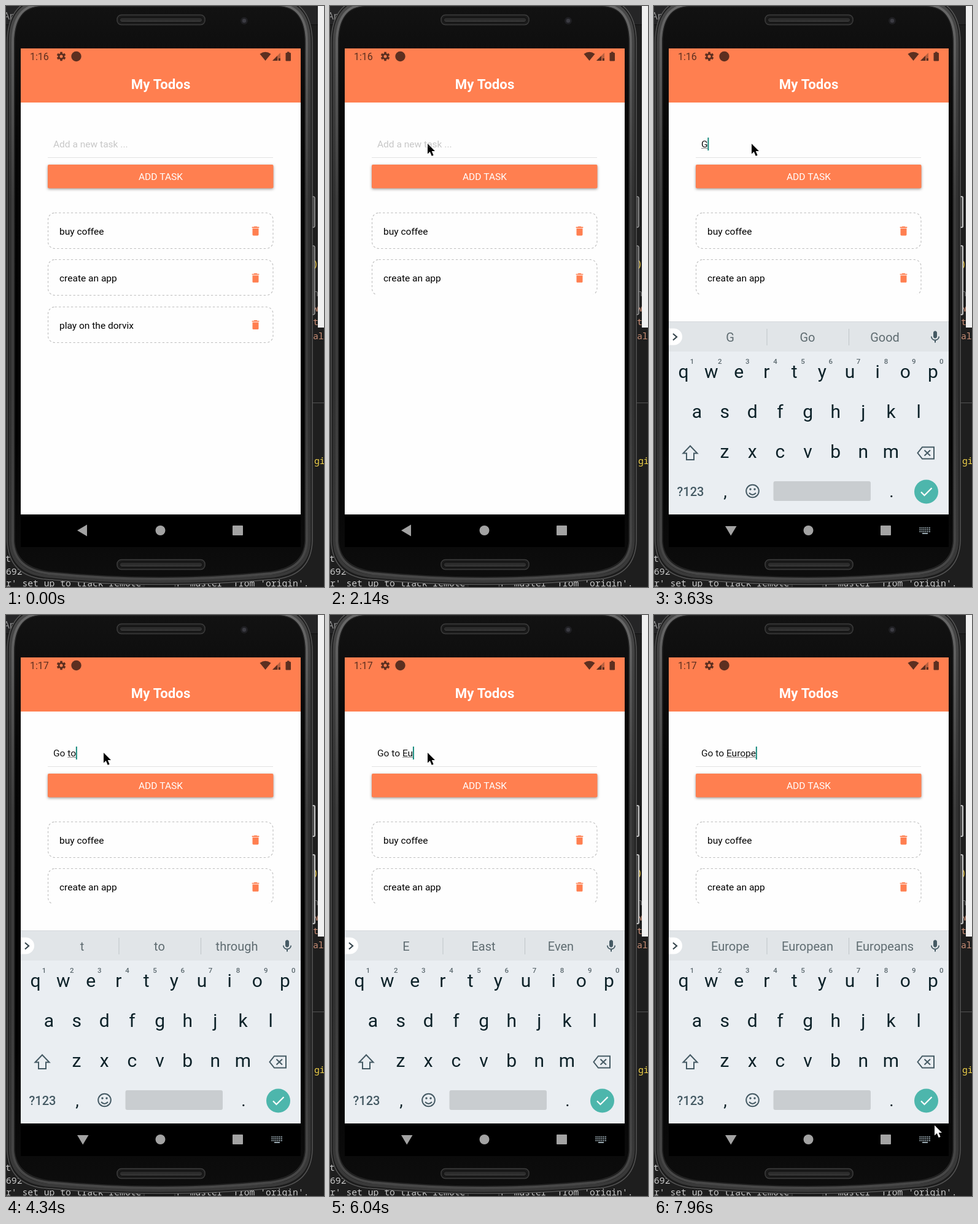
An HTML page with a canvas for the animation above (8000 ms loop, 518 px wide and 945 px high).

```html
<!DOCTYPE html>
<html lang="en">
<head>
<meta charset="utf-8">
<title>My Todos</title>
<style>
  html, body { margin: 0; width: 100%; height: 100%; overflow: hidden; background: #1e1e1e; }
  canvas { display: block; width: 518px; height: 945px; }
</style>
</head>
<body>
<canvas id="stage" width="518" height="945"></canvas>
<script>
const ctx = document.getElementById('stage').getContext('2d');
const LOOP = 8000;
const CORAL = '#ff7f50', TEAL = '#4db6ac', STATUS = '#5c2f20', SLATE = '#455a64', INK = '#0d2229';

// Each track is a list of [start time, value]; values hold until the next entry.
const typed = [
  [0, ''], [3480, 'G'], [3720, 'Go'], [4180, 'Go '], [4260, 'Go t'], [4340, 'Go to'],
  [4490, 'Go to '], [4950, 'Go to E'], [5180, 'Go to Er'], [5330, 'Go to Eru'],
  [5740, 'Go to Er'], [5880, 'Go to E'], [6040, 'Go to Eu'], [6110, 'Go to Eur'],
  [6500, 'Go to Euro'], [6650, 'Go to Europ'], [6730, 'Go to Europe']
];
const hints = [
  [0, ''], [3630, 'G|Go|Good'], [3800, 'Go|Good|Going'], [4340, 't|to|through'],
  [4410, 'to|too|took'], [4490, 'the|bed|home'], [4950, 'E|East|Even'], [5180, 'Er|Her|Were'],
  [5330, 'Eru|Brunch|Europe'], [5960, 'E|East|Even'], [6190, 'Eur|Euro|Europe'],
  [6650, 'Euro|#|Europe'], [6810, 'Europe|European|Europeans']
];
const caretOn = [
  [0, false], [1690, true], [2140, false], [2550, true], [3080, false],
  [3480, true], [7340, false], [7810, true]
];
const pointer = [
  [0, null], [80, [346, 737]], [150, [263, 395]], [380, [252, 338]], [460, [228, 230]],
  [540, [215, 172]], [770, [207, 176]], [850, [192, 186]], [920, [175, 199]],
  [1000, [161, 211]], [1080, [150, 218]], [1150, [142, 213]], [1230, [145, 204]],
  [1390, [133, 209]], [1460, [127, 214]], [1610, [146, 221]], [1690, [159, 224]],
  [7340, [250, 398]], [7420, [405, 692]], [7500, [508, 884]], [7650, [508, 886]],
  [7730, [497, 876]], [7810, [480, 856]], [7880, [466, 840]], [7960, [457, 830]]
];

function at(track, t) {
  let value = track[0][1];
  for (const [start, next] of track) if (t >= start) value = next;
  return value;
}

function text(str, x, y, size, color, align = 'left', weight = 400, family = 'Roboto, sans-serif') {
  ctx.font = `${weight} ${size}px ${family}`;
  ctx.textAlign = align;
  ctx.fillStyle = color;
  ctx.fillText(str, x, y);
}
const mono = (str, x, y, color) =>
  text(str, x, y, 14.7, color, 'left', 500, '"Noto Sans Mono", monospace');

function rect(x, y, w, h, color) {
  ctx.fillStyle = color;
  ctx.fillRect(x, y, w, h);
}

function round(x, y, w, h, r, fill, stroke) {
  ctx.beginPath();
  ctx.roundRect(x, y, w, h, r);
  if (fill) { ctx.fillStyle = fill; ctx.fill(); }
  if (stroke) { ctx.strokeStyle = stroke; ctx.stroke(); }
}

function circle(x, y, r, color) {
  ctx.beginPath();
  ctx.arc(x, y, r, 0, Math.PI * 2);
  ctx.fillStyle = color;
  ctx.fill();
}

function poly(points, color) {
  ctx.beginPath();
  points.forEach(([x, y]) => ctx.lineTo(x, y));
  ctx.closePath();
  ctx.fillStyle = color;
  ctx.fill();
}

function icon(d, x, y, scale, fill, stroke, width = 2) {
  const path = new Path2D(d);
  ctx.save();
  ctx.translate(x, y);
  ctx.scale(scale, scale);
  if (fill) { ctx.fillStyle = fill; ctx.fill(path); }
  if (stroke) { ctx.strokeStyle = stroke; ctx.lineWidth = width; ctx.stroke(path); }
  ctx.restore();
}

function gradient(x0, y0, x1, y1, ...colors) {
  const g = ctx.createLinearGradient(x0, y0, x1, y1);
  colors.forEach((c, i) => g.addColorStop(i / (colors.length - 1), c));
  return g;
}

function drawDesktop() {
  rect(0, 0, 518, 945, '#1e1e1e');
  rect(0, 0, 518, 30, '#252526');
  rect(0, 30, 518, 1, '#111');
  text('App', -4, 22, 15.5, '#969696', 'left', 400, '"Open Sans", sans-serif');
  mono(')', 500, 424, '#f2cc3c');
  mono('n', 500, 472, '#777');
  mono('w', 500, 497, '#ce9178');
  mono('t', 500, 519, '#ce9178');
  mono('al', 500, 542, '#ce9178');
  rect(498, 645, 20, 1, '#555');
  mono('gi', 502, 745, '#f5d54a');
  mono('t', -1, 904, '#ccc');
  mono('692', 0, 925, '#ccc');
  mono("r' set up to track remote branch 'master' from 'origin'.", 0, 944, '#ccc');
  rect(508, 0, 10, 523, '#f0f0f0');
}

function body(inset) {
  const l = 2 + inset, r = 499 - inset, top = inset - 11;
  ctx.beginPath();
  ctx.moveTo(l, 60);
  ctx.bezierCurveTo(l, 20, 18 + inset, top, 58, top);
  ctx.lineTo(443, top);
  ctx.bezierCurveTo(483 - inset, top, r, 20, r, 60);
  ctx.lineTo(r, 870);
  ctx.quadraticCurveTo(r - 2, 925 - inset, 441 - inset, 932 - inset);
  ctx.quadraticCurveTo(250, 950 - inset, 60 + inset, 932 - inset);
  ctx.quadraticCurveTo(l + 2, 925 - inset, l, 870);
  ctx.closePath();
}

function rim(inset, width, color) {
  body(inset);
  ctx.lineWidth = width;
  ctx.strokeStyle = color;
  ctx.stroke();
}

function speaker(y) {
  ctx.lineWidth = 1.5;
  round(181, y, 143, 16, 7, '#1b1b1b', '#3c3c3c');
  ctx.lineWidth = 1;
  round(185, y + 4, 135, 8, 4, gradient(0, y + 4, 0, y + 12, '#242424', '#383838'), '#0c0c0c');
}

function drawPhone() {
  for (const [y, h] of [[310, 50], [390, 112]]) round(496, y, 7, h, 2, '#4a4a4a', '#c4c4c4');
  round(225, 936, 50, 14, 5, '#151515', '#333');
  body(0);
  ctx.fillStyle = '#1c1c1c';
  ctx.fill();
  rim(0, 1.5, '#555');
  rim(5, 5, gradient(0, 0, 0, 945, '#484848', '#303030', '#303030', '#3a3a3a'));
  rim(9, 4, gradient(0, 0, 0, 945, '#686868', '#3c3c3c', '#3c3c3c', '#484848'));
  body(12);
  ctx.fillStyle = gradient(0, 0, 0, 945, '#121212', '#050505', '#020202', '#020202', '#0e0e0e');
  ctx.fill();
  rim(12, 1.2, '#262626');
  speaker(14.5);
  speaker(900.5);
  circle(388, 24, 6, '#1f1f22');
  circle(388, 24, 3.2, '#3b3b42');
  rect(24, 69, 456, 811, '#000');
}

function drawStatus(t) {
  text(t < 4180 ? '1:16' : '1:17', 39, 88, 16, STATUS);
  ctx.save();
  ctx.translate(90, 82);
  for (let i = 0; i < 6; i++) {
    rect(-1.8, -7.3, 3.6, 4, STATUS);
    ctx.rotate(Math.PI / 3);
  }
  ctx.beginPath();
  ctx.arc(0, 0, 3.9, 0, Math.PI * 2);
  ctx.lineWidth = 2.8;
  ctx.strokeStyle = STATUS;
  ctx.stroke();
  ctx.restore();
  circle(114.5, 82, 8.2, STATUS);
  ctx.beginPath();
  ctx.moveTo(422.5, 89);
  ctx.lineTo(413.5, 78);
  ctx.quadraticCurveTo(422.5, 71.5, 431.5, 78);
  ctx.fillStyle = STATUS;
  ctx.fill();
  poly([[434, 89], [447, 76], [447, 89]], '#b8603f');
  poly([[434, 89], [442, 81], [442, 89]], STATUS);
  rect(444, 85, 3, 4, STATUS);
  round(455.5, 76, 8.5, 13.5, 1.2, STATUS);
  rect(458, 74.5, 3.5, 2, STATUS);
}

function drawInput(t) {
  const value = at(typed, t), y = 230, size = 15.53;
  text(value || 'Add a new task ...', 77, y, size, value ? '#111' : '#c7c7c7');
  const end = 77 + (value ? ctx.measureText(value).width : 0);
  const wordStart = value.lastIndexOf(' ') + 1;
  if (wordStart < value.length) {
    const x = 77 + ctx.measureText(value.slice(0, wordStart)).width;
    rect(x, 231, end - x, 1, '#888');
  }
  if (at(caretOn, t)) rect(end - 0.2, 214, 2, 21, '#168a7d');
  rect(68, 246, 367, 1, '#e2e2e2');
}

const TRASH = 'M6 19c0 1.1.9 2 2 2h8c1.1 0 2-.9 2-2V7H6v12zM19 4h-3.5l-1-1h-5l-1 1H5v2h14V4z';

function drawItems(t) {
  ctx.save();
  ctx.beginPath();
  ctx.rect(24, 300, 456, t < 2080 ? 526 : 169);
  ctx.clip();
  ['buy coffee', 'create an app', 'play on the dorvix'].forEach((label, i) => {
    const y = 337 + i * 76.3;
    ctx.setLineDash([3.3, 3.3]);
    ctx.lineWidth = 1.1;
    round(68.5, Math.round(y) - 0.5, 366.5, 58, 11, null, '#bdbdbd');
    ctx.setLineDash([]);
    text(label, 87, Math.round(y + 35), 15.53, '#000');
    icon(TRASH, 396.5, y + 19, 0.833, CORAL);
  });
  ctx.restore();
}

function drawApp(t) {
  rect(24, 69, 456, 758, '#fefefe');
  rect(24, 69, 456, 88, CORAL);
  drawStatus(t);
  text('My Todos', 252, 135, 22.2, '#fff', 'center', 700);
  drawInput(t);
  ctx.save();
  ctx.shadowColor = 'rgba(0,0,0,.38)';
  ctx.shadowBlur = 4;
  ctx.shadowOffsetY = 1.5;
  round(68, 258, 367.5, 38.5, 2, CORAL);
  ctx.restore();
  text('ADD TASK', 252, 283, 15.53, '#fff', 'center');
  drawItems(t);
}

const MIC = 'M12 14c1.66 0 3-1.34 3-3V5c0-1.66-1.34-3-3-3S9 3.34 9 5v6c0 1.66 1.34 3 3 3z' +
  'm5.3-3c0 3-2.54 5.1-5.3 5.1S6.7 14 6.7 11H5c0 3.41 2.72 6.23 6 6.72V21h2v-3.28c3.28-.48 6-3.3 6-6.72z';

function drawBanknotes(x, y) {
  rect(x, y, 9, 14, '#5aa9ea');
  rect(x + 9, y, 2, 14, '#e4f1fb');
  rect(x + 11, y, 11, 14, '#64b0ee');
  rect(x + 16, y, 2, 14, '#d6eafa');
  text('€', x + 5, y + 10, 8, '#eaf4fc', 'center', 700);
}

function drawHints(t) {
  rect(24, 513, 456, 49, '#e1e5e8');
  rect(24, 513, 456, 1, '#d5d9dc');
  round(24, 524.5, 22, 27, [0, 13.5, 13.5, 0], '#fff');
  icon('M31 533L37 538.2L31 543.5', 0, 0, 1, null, '#37474f', 2.2);
  icon(MIC, 446, 526.5, 1, SLATE);
  const words = at(hints, t);
  if (!words) {
    text('Suggest contacts? Tap for info.', 250, 545, 17.76, TEAL, 'center');
    return;
  }
  rect(183.5, 525, 1, 27, '#bfc5c8');
  rect(317, 525, 1, 27, '#bfc5c8');
  words.split('|').forEach((word, i) => {
    const x = 124 + i * 126;
    if (word === '#') drawBanknotes(x - 11, 533);
    else text(word, x, 546, 20, '#5f6c71', 'center');
  });
}

function drawKeyboard(t) {
  const upper = t < 3630;
  rect(24, 513, 456, 314, '#eaeef2');
  drawHints(t);
  [['qwertyuiop', 48], ['asdfghjkl', 70], ['zxcvbnm', 115]].forEach(([letters, x], row) => {
    [...letters].forEach((key, i) => {
      const y = (upper ? 607 : 605) + row * 65.2;
      text(upper ? key.toUpperCase() : key, x + i * 45.15, y, 30, INK, 'center');
      if (row === 0) text((i + 1) % 10, 62 + i * 45.15, 582, 11.5, '#5b686e', 'center', 500);
    });
  });
  icon('M59 715.5L70.5 727.5H65V738H53V727.5H47.5Z', 0, 0, 1, upper ? SLATE : null, SLATE, upper ? 1 : 2);
  icon('M437 717.5H456V736.5H437L429.5 727Z M440.5 722.5L450 731.5M450 722.5L440.5 731.5', 0, 0, 1, null, SLATE);

  text('?123', 59.5, 797, 20, SLATE, 'center', 500);
  text(',', 116, 799, 28, INK, 'center');
  text('.', 387, 799, 28, INK, 'center');
  ctx.beginPath();
  ctx.arc(160.5, 789, 10.3, 0, Math.PI * 2);
  ctx.moveTo(166, 792);
  ctx.quadraticCurveTo(160.5, 798, 155, 792);
  ctx.lineWidth = 2;
  ctx.strokeStyle = SLATE;
  ctx.stroke();
  circle(157, 786, 1.7, SLATE);
  circle(164, 786, 1.7, SLATE);
  round(194.5, 773, 158.5, 32, 3, '#c9cdd0');
  circle(443.5, 790, 19.5, TEAL);
  icon('M435 790.5L440.5 796L452.5 784', 0, 0, 1, null, '#fff', 2.2);
}

function drawNav(keyboardOpen) {
  const gray = '#a3a3a3';
  poly(keyboardOpen
    ? [[116, 846], [134.5, 846], [125.2, 861.5]]
    : [[116, 853], [132, 843.5], [132, 862.5]], gray);
  circle(251.5, 853, 8, gray);
  round(369, 845, 17, 16, 1, gray);
  if (!keyboardOpen) return;
  for (let row = 0; row < 3; row++)
    for (let i = 0; i < 6; i++)
      rect(432.5 + i * 3.1, 848 + row * 3, 1.8, 1.8, '#a9bac2');
  rect(437, 857, 9, 1.8, '#a9bac2');
}

// The pointer inverts whatever lies beneath it.
function drawPointer(pos) {
  if (!pos) return;
  ctx.save();
  ctx.globalCompositeOperation = 'difference';
  ctx.translate(...pos);
  poly([[0, 0], [0, 16.5], [3.8, 13], [6.8, 20], [9.6, 18.8], [6.7, 12], [12, 12]], '#fff');
  ctx.restore();
}

function frame(now) {
  const t = now % LOOP, keyboardOpen = t >= 2460;
  drawDesktop();
  drawPhone();
  drawApp(t);
  if (keyboardOpen) drawKeyboard(t);
  drawNav(keyboardOpen);
  drawPointer(at(pointer, t));
}

const start = performance.now();
function tick() {
  frame(performance.now() - start);
  requestAnimationFrame(tick);
}
tick();
</script>
</body>
</html>
```
